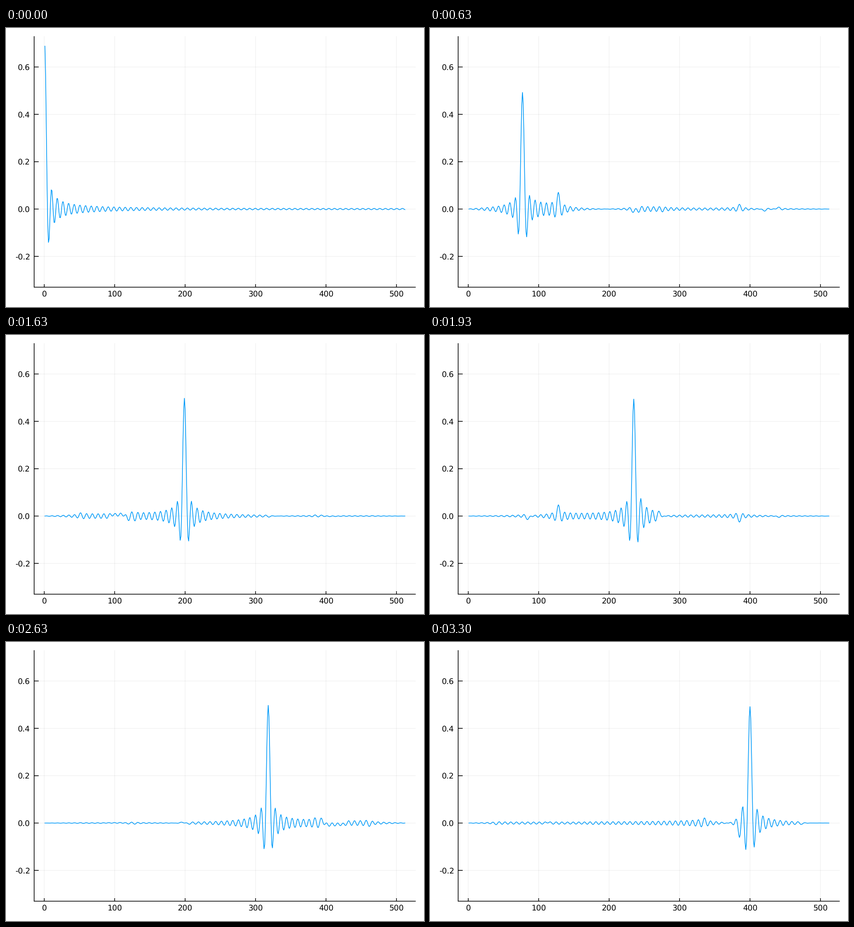
These frames come from a looping animation (917x611 px, 3.33 s). A matplotlib script:

```python
import numpy as np
import matplotlib.pyplot as plt
from matplotlib.animation import FuncAnimation

W, H = 917, 611
N, BAND = 512, 128
TICK_MS, LOOP_MS = 10, 3330
LEFT, RIGHT, TOP, BOTTOM = 61.7, 898.8, 18, 567.6
XLIM = (-14.33, 527.33)
YLIM = (-0.33, 0.73)


def px(t):
    return LEFT + (t - XLIM[0]) / (XLIM[1] - XLIM[0]) * (RIGHT - LEFT)


def py(v):
    return BOTTOM - (v - YLIM[0]) / (YLIM[1] - YLIM[0]) * (BOTTOM - TOP)


def pt(pixels):
    return pixels * 0.72


def lowpass_kernel():
    """Projector onto the lowest cosine modes of a path with N nodes."""
    t = np.arange(N) + 0.5
    modes = np.cos(np.pi * np.outer(t, np.arange(BAND)) / N)
    modes /= np.linalg.norm(modes, axis=0)
    return modes @ modes.T


def orthogonalize(vectors):
    """Gram-Schmidt that always takes the column of least l1 norm next."""
    v = vectors / np.linalg.norm(vectors, axis=0)
    q = np.zeros_like(v)
    left = list(range(v.shape[1]))
    while left:
        norms = np.round(np.abs(v[:, left]).sum(axis=0), 9)
        k = left.pop(int(np.argmin(norms)))
        q[:, k] = v[:, k] / np.linalg.norm(v[:, k])
        v[:, left] -= np.outer(q[:, k], q[:, k] @ v[:, left])
    return q


# Wavelet centres: every fourth node, shifted from quarter to quarter
centres = np.concatenate([np.arange(a, a + 125, 4) for a in (1, 131, 258, 388)])
wavelets = orthogonalize(lowpass_kernel()[:, centres - 1])

plt.rcParams["font.family"] = "DejaVu Sans"
plt.rcParams["text.hinting"] = "none"
fig = plt.figure(figsize=(W / 100, H / 100), dpi=100, facecolor="white")
ax = fig.add_axes([0, 0, 1, 1])
ax.set_xlim(0, W)
ax.set_ylim(H, 0)
ax.axis("off")

grid = dict(colors="black", lw=pt(0.8), alpha=0.09, snap=False)
axis = dict(colors="black", lw=pt(1.53), snap=False)

ticks_x = np.arange(0, 501, 100)
ticks_y = np.arange(-1, 4) / 5
ax.vlines(px(ticks_x), TOP, BOTTOM, **grid)
ax.hlines(py(ticks_y), LEFT, RIGHT, **grid)
ax.vlines(px(ticks_x), BOTTOM - 6.6, BOTTOM, **axis)
ax.hlines(py(ticks_y), LEFT, LEFT + 10, **axis)
ax.vlines(LEFT, TOP, BOTTOM + 0.7, **axis)
ax.hlines(BOTTOM, LEFT, RIGHT, **axis)


def label(x, y, text, align):
    ax.text(x, y, text, ha=align, va="baseline", fontsize=pt(17), color="black")


for t in ticks_x:
    label(px(t), 588, str(t), "center")
for v in ticks_y:
    label(53, py(v) + 6.2, f"{v:.1f}", "right")

curve, = ax.plot(px(np.arange(1, N + 1)), py(wavelets[:, 0]), color="#009AF9",
                 lw=pt(1.53), solid_joinstyle="miter", zorder=3)


def draw(tick):
    # Thirty wavelets a second, each start rounded to the nearest tick
    curve.set_ydata(py(wavelets[:, (3 * tick + 1) // 10]))
    return curve,


anim = FuncAnimation(fig, draw, frames=LOOP_MS // TICK_MS, interval=TICK_MS,
                     repeat=True, repeat_delay=0)
plt.show()
```
